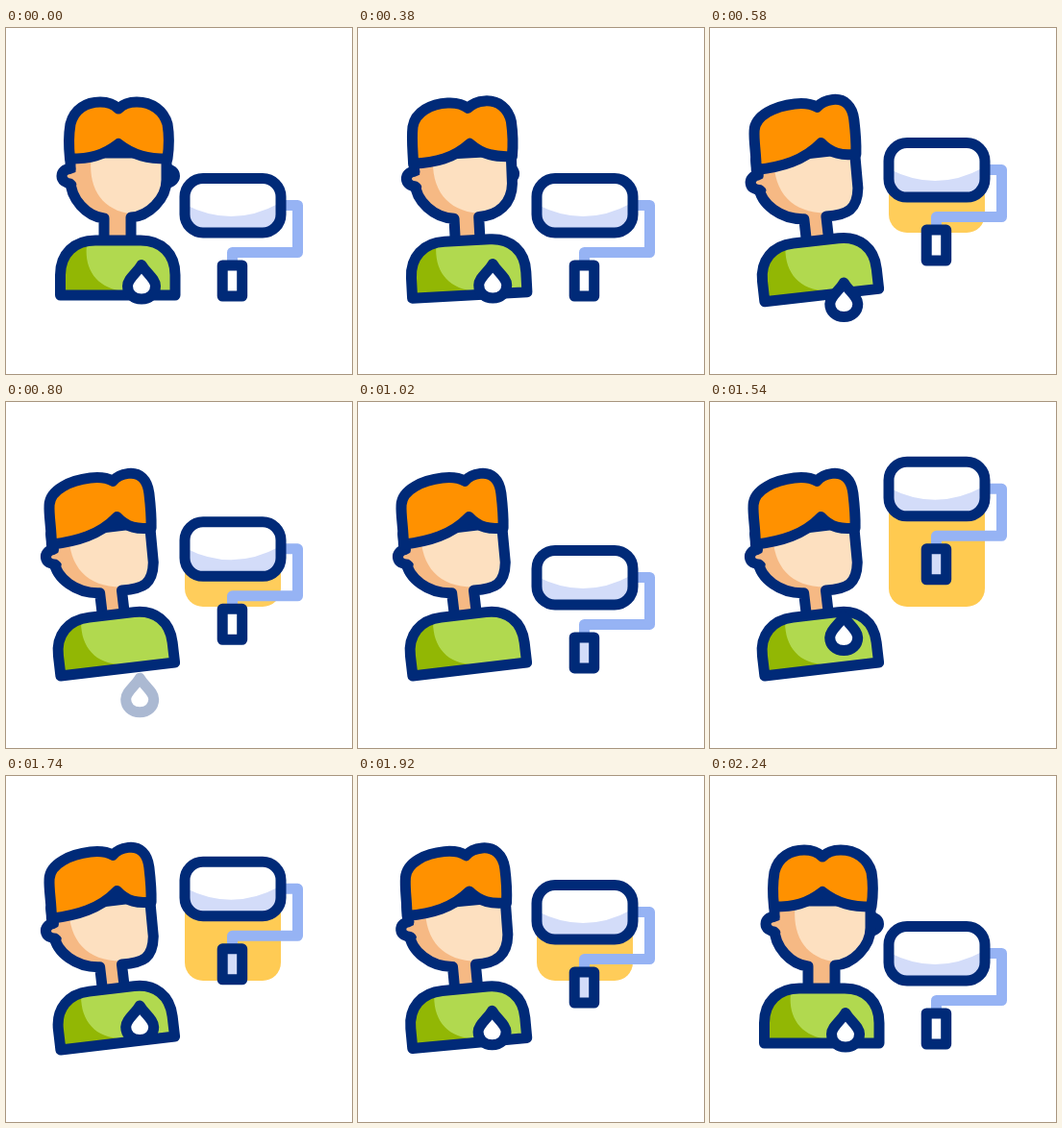
Recreate the animation shown at these times as an HTML page. Size 360x360 px, loop 2400 ms.

```html
<!DOCTYPE html>
<html lang="en">
<head>
<meta charset="utf-8">
<title>Painter</title>
<style>
  html, body { margin: 0; width: 100%; height: 100%; overflow: hidden; background: #fff; }
  svg { display: block; width: 100vw; height: 100vh; }
  .line { stroke: #002a78; stroke-width: 11; stroke-linejoin: round; stroke-linecap: round; }
</style>
</head>
<body>
<svg viewBox="0 0 360 360" fill="none">
  <defs>
    <clipPath id="faceClip"><path id="faceMask"/></clipPath>
    <clipPath id="bodyClip"><path id="bodyMask"/></clipPath>
  </defs>

  <rect id="paint" x="186" width="100" rx="19" fill="#ffca50"/>
  <g id="roller">
    <path d="M286 184.500H303.500V233.500H235.500V246" stroke="#96b3f4" stroke-width="11" stroke-linejoin="round"/>
    <rect x="186" y="156.500" width="100" height="56.500" rx="19" fill="#fff"/>
    <path d="M187 184Q236 209 285 182V194Q285 212 267 212H205Q187 212 187 194Z" fill="#d3dcf9"/>
    <rect class="line" x="186" y="156.500" width="100" height="56.500" rx="19"/>
    <rect id="grip" class="line" x="225.200" y="247" width="20.500" height="32"/>
  </g>

  <g id="person">
    <path id="earRight" class="line" fill="#fff" d="M162 146.500H167C172 147 175.500 150 175.500 154C175.500 158 171 161.500 165 161.500"/>
    <path id="face" fill="#f6b984"/>
    <path id="faceLight" fill="#fde0c0" clip-path="url(#faceClip)"/>
    <path id="faceLine" class="line"/>
    <g id="earLeft">
      <path class="line" d="M67 146.500C61 146.500 58 150 58 154C58 158.500 62 161.500 68 162"/>
      <path fill="#f6b984" d="M75 149L67 152C62.500 152 62.500 156 67 156.500Q71 157 74 163Z"/>
    </g>
    <path id="hair" class="line" fill="#ff9100"/>
    <path id="body" fill="#b1d94f"/>
    <path d="M50 215H86C78 245 90 271 124 274V284H50Z" fill="#92b704" clip-path="url(#bodyClip)"/>
    <path id="bodyLine" class="line"/>
  </g>

  <path id="drop" class="line" fill="#fff"
    d="M0 -17.500C-5 -9 -14.500 -3 -14.500 4.500C-14.500 12.500 -8.500 18 0 18C8.500 18 14.500 12.500 14.500 4.500C14.500 -3 5 -9 0 -17.500Z"/>
</svg>

<script>
const LOOP = 2400;
const TILT = 6.7;
const PIVOT = { x: 116.5, y: 278 };
const el = id => document.getElementById(id);
const set = (id, attrs) => {
  for (const name in attrs) el(id).setAttribute(name, attrs[name]);
};

// Linear interpolation through [time, value] pairs.
function track(keys, t) {
  if (t <= keys[0][0]) return keys[0][1];
  for (let i = 1; i < keys.length; i++) {
    const [t0, v0] = keys[i - 1], [t1, v1] = keys[i];
    if (t < t1) return v0 + (v1 - v0) * (t - t0) / (t1 - t0);
  }
  return keys[keys.length - 1][1];
}
const smooth = u => (1 - Math.cos(Math.PI * u)) / 2;

const turnKeys = [[200, 0], [600, 1], [1840, 1], [2240, 0]];
const rollKeys = [[400, 0], [660, -53], [1010, 0], [1520, -97], [2240, 0]];
const fallKeys = [[360, 0], [810, 1]];
const refillKeys = [[1400, -32], [1800, 0]];
const fadeKeys = [[720, 1], [840, 0], [1400, 0], [1500, 1]];

const bodyPath = "M56.500 278V257C56.500 235 71 221 93 221H140C162 221 176 235 176 257V278Z";
for (const id of ["body", "bodyMask", "bodyLine"]) set(id, { d: bodyPath });

function drawHead(k) {
  const mix = (a, b) => (a + (b - a) * k).toFixed(2);
  const neck = mix(102, 107);
  const cheek = mix(67, 63.5);
  const face = `M${cheek} 130V158C${cheek} ${mix(178, 177)} ${mix(84, 83)} ${mix(196, 195)} ${neck} ${mix(198, 197)}V223H130V197` +
    `C${mix(148, 153)} ${mix(196, 198)} ${mix(167, 163)} ${mix(178, 194)} ${mix(167, 166)} ${mix(158, 172)}L167 130Z`;
  for (const id of ["face", "faceMask", "faceLine"]) set(id, { d: face });
  set("faceLight", {
    d: `M${mix(90, 83)} 125C${mix(82, 76)} 166 ${mix(100, 95)} 192 136 194L175 198V125Z`
  });

  const part = mix(117, 134);
  const fringe = `${mix(66.5, 63)} ${mix(136, 141)}`;
  set("hair", {
    d: `M${fringe}C65 122 ${mix(65, 63.5)} 112 ${mix(67, 65.5)} 100C${mix(71, 68)} 84 ${mix(84, 91)} 77 ${mix(98, 111)} 77` +
      `Q${mix(110, 126)} 77 ${part} ${mix(84, 83)}Q${mix(124, 140)} 77 ${mix(136, 151)} 77` +
      `C${mix(152, 163)} 77 ${mix(164, 170)} 86 ${mix(168, 170)} 100C170 112 170 122 168 136` +
      `C${mix(148, 154)} 136 ${mix(133, 143)} 133 ${part} 120.500` +
      `C${mix(101, 114)} ${mix(133, 137)} ${mix(87, 90)} ${mix(136, 141)} ${fringe}Z`
  });
  set("earRight", { transform: `translate(${-14 * k} 0)` });
  set("earLeft", { transform: `translate(${-2.5 * k} 0)` });
}

function draw(t) {
  const turn = track(turnKeys, t);
  const angle = TILT * turn;
  drawHead(turn);
  set("person", { transform: `rotate(${-angle} ${PIVOT.x} ${PIVOT.y})` });

  // The drop rides on the shirt but always falls straight down.
  const rad = angle * Math.PI / 180, dx = 24.5, dy = -14;
  const x = PIVOT.x + dx * Math.cos(rad) + dy * Math.sin(rad);
  const y = PIVOT.y + dy * Math.cos(rad) - dx * Math.sin(rad);
  const shift = t < 1200 ? 43.5 * smooth(track(fallKeys, t)) : track(refillKeys, t);
  set("drop", { transform: `translate(${x} ${y + shift})`, opacity: track(fadeKeys, t) });

  const roll = track(rollKeys, t);
  set("roller", { transform: `translate(0 ${roll})` });
  set("paint", { y: 156.5 + roll, height: 56.5 - roll, opacity: 0.9 + 0.1 * Math.min(1, -roll / 94) });
  set("grip", { fill: t >= 1010 && t < 2240 ? "#d3dcf9" : "#fff" });
}

const start = performance.now();
function tick(now) {
  draw(Math.max(0, now - start) % LOOP);
  requestAnimationFrame(tick);
}
draw(0);
requestAnimationFrame(tick);
</script>
</body>
</html>
```
